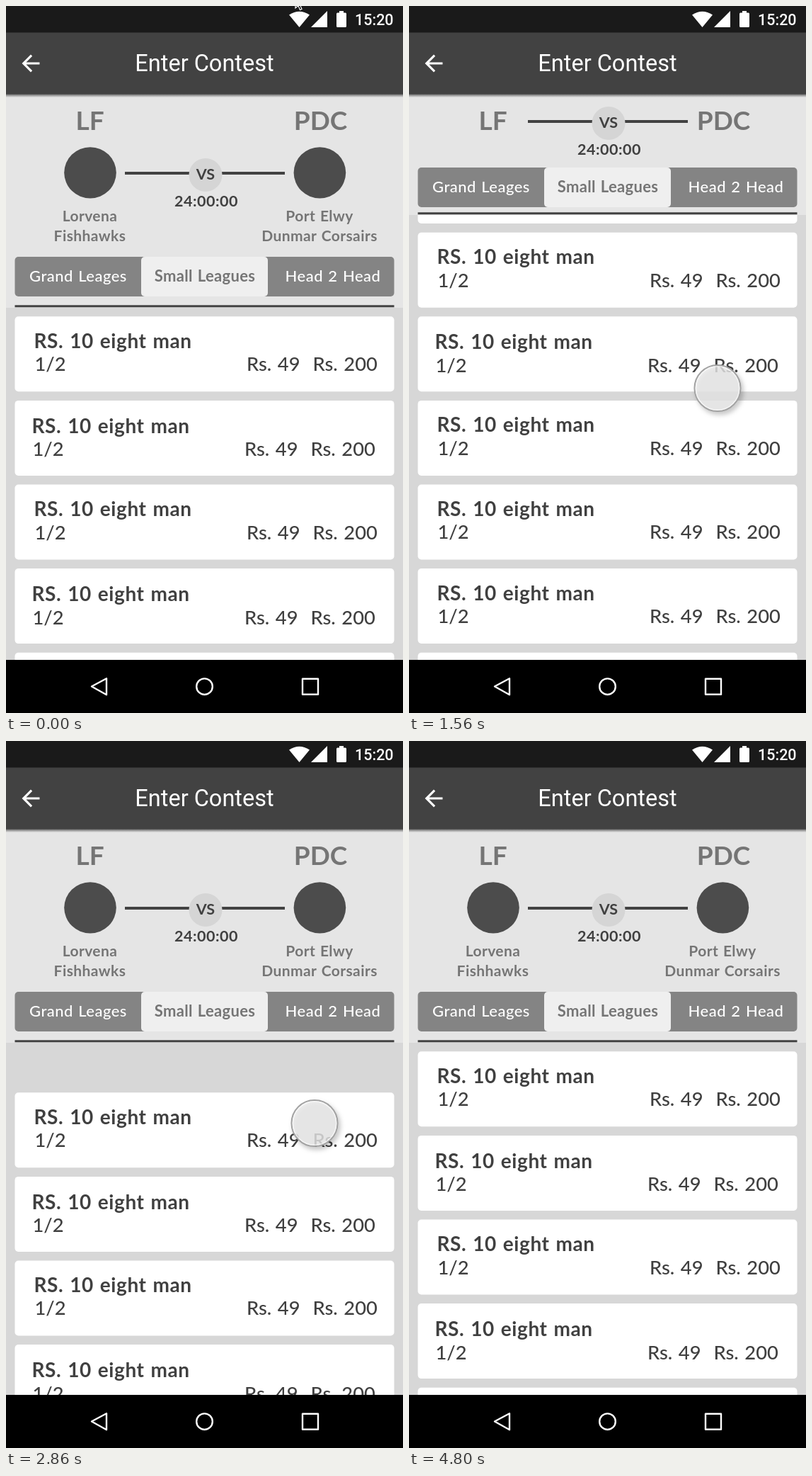
An HTML page for the animation above (5.54 s loop, 561 by 998 pixels).

```html
<!DOCTYPE html>
<html lang="en">
<head>
<meta charset="utf-8">
<title>Enter Contest</title>
<style>
  html, body { margin: 0; width: 100%; height: 100%; overflow: hidden; background: #d7d7d7; }
  svg { display: block; width: 100%; height: 100%; }
  text { font-family: Lato, "Open Sans", sans-serif; font-weight: 500; word-spacing: .06em; }
  .mid { text-anchor: middle; }
  .system { font-family: Roboto, sans-serif; fill: #fff; word-spacing: 0; }
  .heading { font-size: 32.5px; font-weight: 400; }
  .clock { font-size: 21.5px; }
  .card-title { font-size: 28px; font-weight: 700; letter-spacing: .022em; word-spacing: .05em; fill: #404040; }
  .card-info { font-size: 27.3px; fill: #404040; }
  .short { font-size: 37px; font-weight: 700; fill: #757575; }
  .team { font-size: 21px; font-weight: 700; letter-spacing: .02em; fill: #757575; }
  .tab { font-size: 22px; letter-spacing: .022em; fill: #fff; }
  .tab.active { font-weight: 700; letter-spacing: .015em; fill: #757575; }
  .versus { font-size: 21.5px; font-weight: 700; fill: #404040; }
  #pointer { filter: drop-shadow(3px 4px 3px rgba(0, 0, 0, .25)); }
</style>
</head>
<body>
<svg viewBox="0 0 561 998">
  <defs>
    <linearGradient id="shade" x2="0" y2="1">
      <stop stop-color="#000" stop-opacity=".6"/>
      <stop offset="1" stop-color="#000" stop-opacity="0"/>
    </linearGradient>
  </defs>
  <rect width="561" height="998" fill="#d7d7d7"/>
  <g id="list"></g>

  <rect id="panel" y="-74" width="561" height="500" fill="#e5e5e5"/>
  <g id="badges" fill="#4c4c4c">
    <ellipse cx="119" cy="235.3" rx="36.8" ry="36.1"/>
    <ellipse cx="443.4" cy="235.3" rx="36.8" ry="36.1"/>
  </g>
  <g id="teams" class="mid">
    <text class="team" x="118.5" y="304">Lorvena</text>
    <text class="team" x="118.5" y="332">Fishhawks</text>
    <text class="team" x="443" y="304">Port Elwy</text>
    <text class="team" x="443" y="332">Dunmar Corsairs</text>
  </g>
  <text class="short mid" x="118.5" y="175">LF</text>
  <text class="short mid" x="444.5" y="175">PDC</text>
  <g id="versus">
    <path d="M168 236H394" stroke="#424242" stroke-width="4"/>
    <circle cx="282" cy="238.5" r="23.5" fill="#d5d5d5"/>
    <text class="versus mid" x="282" y="245">VS</text>
    <text class="versus mid" x="283" y="282.5" letter-spacing=".5">24:00:00</text>
  </g>
  <g id="tabs">
    <rect x="12.5" y="354" width="536" height="56" rx="5" fill="#848484"/>
    <rect x="191" y="354" width="179" height="56" rx="5" fill="#efefef"/>
    <text class="tab mid" x="102" y="389">Grand Leages</text>
    <text class="tab mid active" x="281" y="389">Small Leagues</text>
    <text class="tab mid" x="462" y="389">Head 2 Head</text>
  </g>
  <path id="rule" d="M12.5 423.7H548.5" stroke="#424242" stroke-width="3"/>

  <rect y="124" width="561" height="5" fill="url(#shade)"/>
  <rect y="37" width="561" height="87.5" fill="#424242"/>
  <rect width="561" height="37.5" fill="#1a1a1a"/>
  <path transform="translate(16.3 62.3) scale(1.558)" fill="#fff"
        d="M20 11H7.83l5.59-5.59L12 4l-8 8 8 8 1.41-1.41L7.83 13H20z"/>
  <text class="system heading mid" x="280.5" y="92">Enter Contest</text>
  <g fill="#fff">
    <path d="M414.5 30L400 12.5Q414.5 3 429 12.5Z"/>
    <path d="M431 30L454 7V30Z"/>
    <path d="M471 7h6v2.5h2.5q1.5 0 1.5 1.5V28.5q0 1.5-1.5 1.5H468.5q-1.5 0-1.5-1.5V11q0-1.5 1.5-1.5H471Z"/>
  </g>
  <text class="system clock" x="493" y="26.5">15:20</text>

  <rect y="923" width="561" height="75" fill="#000"/>
  <g fill="none" stroke="#fff" stroke-width="2.4" stroke-linejoin="round">
    <path d="M121 960.5L142 949.3V972.2Z"/>
    <circle cx="280.5" cy="960.7" r="11.3"/>
    <rect x="419" y="949.7" width="22" height="22"/>
  </g>

  <path id="arrow" transform="translate(409 -13)" fill="#000" stroke="#fff" stroke-width="1.2"
        d="M0 0V16L4 12.5 6.5 18.5 9 17.5 6.5 11.5H11.5Z"/>
  <g id="pointer">
    <circle r="32.5" fill="#ebebeb" fill-opacity=".8" stroke="#a2a2a2" stroke-width="2"/>
    <circle r="30.7" fill="none" stroke="#fff" stroke-opacity=".6" stroke-width="1.5"/>
  </g>
</svg>
<script>
const LOOP = 5540;
const COLLAPSE = 336;   // scroll distance that folds the header
const CARD_PITCH = 118.6;
const $ = id => document.getElementById(id);
const clamp = v => Math.min(1, Math.max(0, v));
const lerp = (a, b, u) => a + (b - a) * u;

function card(i) {
  const shifted = i === 1 || i === 3;
  const top = 438.3 + i * CARD_PITCH;
  const dx = shifted ? -3 : 0;
  const dy = top + (shifted ? 1.5 : 0);
  const label = (x, y, kind, words) =>
    `<text class="card-${kind}" x="${x + dx}" y="${dy + y}">${words}</text>`;
  return `<rect x="12.5" y="${top}" width="536" height="106" rx="5" fill="#fff"/>` +
    label(39.5, 44.5, "title", "RS. 10 eight man") +
    label(40.5, 77, "info", "1/2") +
    label(340, 77, "info", "Rs. 49") +
    label(433.5, 77, "info", "Rs. 200");
}
$("list").innerHTML = Array.from({ length: 9 }, (_, i) => card(i)).join("");

// Flick up with momentum, then flick down past the top and spring back.
function scrollAt(t) {
  if (t < 1020) return 0;
  if (t < 1040) return lerp(0, 22, (t - 1020) / 20);
  if (t < 1360) return lerp(22, 258.5, (t - 1040) / 320);
  if (t < 2100) return 402 - 143.5 * Math.exp(-(t - 1360) * .00564);
  if (t < 2500) return 400;
  if (t < 2860) {
    const u = (t - 2500) / 360;
    return lerp(400, -58, (4 * u - u ** 4) / 3);
  }
  if (t < 3560) {
    const s = (t - 2860) / 90;
    return -58 * (1 + s) * Math.exp(-s);
  }
  return 0;
}

const pointerPath = [
  [60, 411, 2], [120, 432, 105], [180, 456, 245], [240, 466, 370],
  [300, 459, 465], [360, 443, 522], [420, 436, 539.5],
  [4340, 436, 539.5], [4440, 434, 490], [4560, 427, 310],
  [4680, 419, 110], [4780, 415, -30], [4800, 414, -60]
];
function pointerAt(t) {
  const k = pointerPath.findIndex(p => t < p[0]);
  if (k < 1) return null;
  const [a, b] = [pointerPath[k - 1], pointerPath[k]];
  const u = (t - a[0]) / (b[0] - a[0]);
  return [lerp(a[1], b[1], u), lerp(a[2], b[2], u)];
}

const move = (id, x, y) => $(id).setAttribute("transform", `translate(${x} ${y})`);
const lifts = { panel: 131, rule: 131, tabs: 126, versus: 73, badges: 152, teams: 219 };

function draw(t) {
  const scroll = scrollAt(t);
  const fold = clamp(scroll / COLLAPSE);
  move("list", 0, -scroll);
  for (const id in lifts) move(id, 0, -lifts[id] * fold);
  $("badges").style.opacity = $("teams").style.opacity = 1 - fold;

  const spot = pointerAt(t);
  $("pointer").style.display = spot ? "" : "none";
  if (spot) move("pointer", ...spot);
  $("arrow").style.display = t < 60 ? "" : "none";
}

const start = performance.now();
function tick() {
  draw((performance.now() - start) % LOOP);
  requestAnimationFrame(tick);
}
tick();
</script>
</body>
</html>
```
